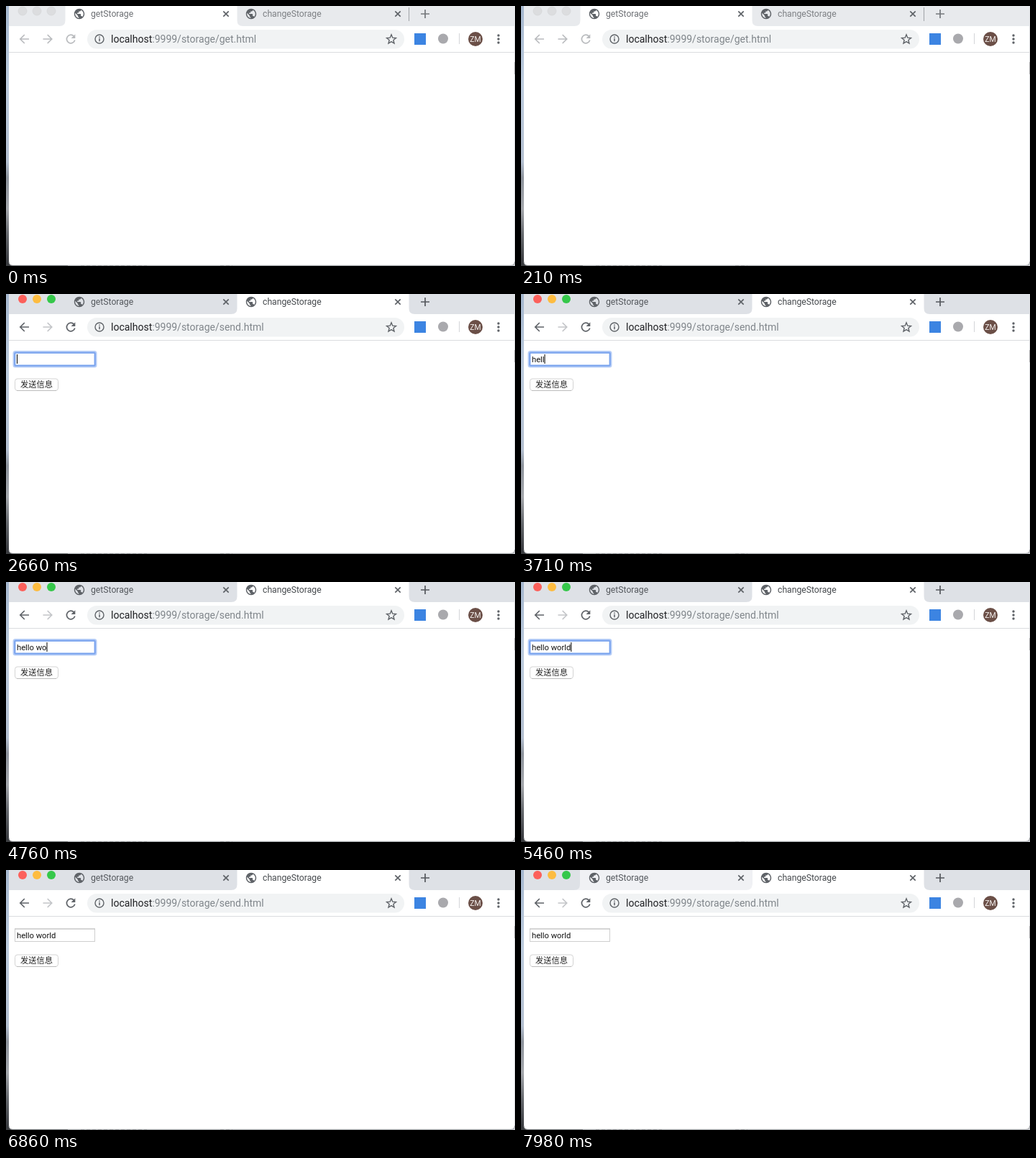
Animation of 708 by 362 pixels, one loop 8000 ms. Source, as an HTML page:

```html
<!DOCTYPE html>
<html lang="en">
<head>
<meta charset="utf-8">
<title>Storage tabs</title>
<style>
  html, body { margin: 0; width: 100%; height: 100%; overflow: hidden; background: #fff; }
  svg { display: block; }
  text { font-family: Roboto, sans-serif; white-space: pre; }
  .title { font-size: 12.2px; }
  .url { font-size: 14px; }
  .line { fill: none; stroke-width: 1.7; }
  .cjk { font-family: "Noto Sans CJK SC", "Noto Sans CJK", sans-serif; font-size: 11.25px; }

  #win {
    --bar: #dee1e6; --icon: #5f6368; --back: #5f6368; --next: #c3c5c8;
    --red: #fc605b; --amber: #fdbc40; --green: #35c84a;
    --rim: none; --name1: #54585d; --name2: #45494d; --plus: #54585d;
  }
  #win.idle {
    --bar: #e8eaed; --back: #b9bbbe; --next: #b9bbbe;
    --red: #dcdddf; --amber: #dcdddf; --green: #dcdddf;
    --rim: #d2d3d5; --name1: #6c6f73; --name2: #7c7f83; --plus: #75787c;
  }
  .idle .send, #win:not(.idle) .get { display: none; }
</style>
</head>
<body>
<svg width="708" height="362" viewBox="0 0 708 362">
  <defs>
    <linearGradient id="sky" x2="0" y2="1">
      <stop offset="0" stop-color="#a5b7ce"/>
      <stop offset=".3" stop-color="#bccbdd"/>
      <stop offset=".6" stop-color="#b3bfd0"/>
      <stop offset=".66" stop-color="#8d939c"/>
      <stop offset=".78" stop-color="#a4a7ac"/>
      <stop offset=".88" stop-color="#66696e"/>
      <stop offset="1" stop-color="#34363a"/>
    </linearGradient>
    <path id="tab" d="M-8 28Q0 28 0 20V-4H239V20Q239 28 247 28Z"/>
    <path id="globe" transform="scale(.72) translate(-12 -12)" d="M12 2C6.48 2 2 6.48 2 12s4.48 10 10 10 10-4.48 10-10S17.52 2 12 2zm-1 17.93c-3.95-.49-7-3.85-7-7.93 0-.62.08-1.21.21-1.79L9 15v1c0 1.1.9 2 2 2v1.93zm6.9-2.54c-.26-.81-1-1.39-1.9-1.39h-1v-3c0-.55-.45-1-1-1H8v-2h2c.55 0 1-.45 1-1V7h2c1.1 0 2-.9 2-2v-.41c2.93 1.19 5 4.06 5 7.41 0 2.08-.8 3.97-2.1 5.39z"/>
    <path id="cross" class="line" d="M-3.7-3.7 3.7 3.7M3.7-3.7-3.7 3.7"/>
    <path id="arrow" class="line" d="M6.5 0H-5.5M.3-6-5.7 0 .3 6"/>
    <clipPath id="frame"><path d="M4-9H707.4V356Q707.4 361 702 361H9Q4 361 4 356Z"/></clipPath>
  </defs>

  <!-- desktop behind the window -->
  <rect width="708" height="362" fill="#c9cbcf"/>
  <rect width="6" height="362" fill="url(#sky)"/>
  <path d="M0 359H86V362H0Z" fill="#3b3d40"/>
  <path d="M104 361.5H196M298 361.5H315" stroke="#8b8d90" stroke-dasharray="5 3"/>
  <path d="M707.5 78V95" stroke="#77797d"/>

  <g id="win" clip-path="url(#frame)">
    <rect x="4" width="704" height="362" fill="#fff"/>
    <rect x="4" width="704" height="28" fill="var(--bar)"/>
    <use id="hover" class="send" href="#tab" x="82" fill="#f0f1f4" opacity="0"/>
    <use class="get" href="#tab" x="82.5" fill="#fff"/>
    <use class="send" href="#tab" x="321.5" fill="#fff"/>
    <path class="get" d="M560.5 2V21" stroke="#a0a3a7"/>

    <g stroke="var(--rim)" stroke-width=".6">
      <circle cx="23" cy="7" r="6" fill="var(--red)"/>
      <circle cx="43" cy="7" r="6" fill="var(--amber)"/>
      <circle cx="63" cy="7" r="6" fill="var(--green)"/>
    </g>

    <g fill="var(--icon)">
      <use href="#globe" x="102" y="11"/>
      <use href="#globe" x="341" y="11"/>
    </g>
    <text class="title" x="118" y="15.2" fill="var(--name1)">getStorage</text>
    <text class="title" x="357" y="15.2" fill="var(--name2)">changeStorage</text>
    <g stroke="var(--icon)">
      <use href="#cross" x="306" y="11"/>
      <use href="#cross" x="545" y="11"/>
    </g>
    <path class="line" d="M577 11H589M583 5V17" stroke="var(--plus)"/>

    <use href="#arrow" x="25.5" y="46" stroke="var(--back)"/>
    <use href="#arrow" transform="translate(58 46) scale(-1 1)" stroke="var(--next)"/>
    <g stroke="var(--back)">
      <path class="line" d="M94.6 42.2A5.8 5.8 0 1 0 95.8 47.5"/>
      <path d="M96.3 39.3V45H90.6Z" fill="var(--back)" stroke="none"/>
    </g>

    <rect x="113" y="33" width="441" height="26.500" rx="13.200" fill="#f1f3f4"/>
    <circle class="line" cx="130" cy="46" r="6" stroke="#5f6368" style="stroke-width:1.4"/>
    <path d="M130 45V49.300M130 42.500V44" stroke="#5f6368" stroke-width="1.500"/>
    <text class="url" x="146" y="51" fill="#80868b"><tspan fill="#202124">localhost</tspan>:9999/storage/<tspan id="page"></tspan>.html</text>
    <path id="star" class="line" stroke="#5f6368" style="stroke-width:1.4"/>

    <rect x="568" y="38" width="16" height="16" fill="#3c84e2"/>
    <circle cx="608" cy="45.500" r="7" fill="#a9a9ad"/>
    <path d="M630.500 38V53" stroke="#d3d5d8"/>
    <circle cx="653" cy="46" r="10" fill="#6b4f47"/>
    <text x="653" y="49.800" font-size="10.500" text-anchor="middle" fill="#f5f1ef">ZM</text>
    <g fill="#5f6368">
      <circle cx="685" cy="41" r="1.700"/>
      <circle cx="685" cy="46" r="1.700"/>
      <circle cx="685" cy="51" r="1.700"/>
    </g>
    <path d="M4 64.500H708" stroke="#dbdcde"/>

    <g class="send">
      <rect x="12.500" y="82" width="111" height="17.500" fill="#fff" stroke="#cfcfcf"/>
      <path d="M12 82H124" stroke="#b9b9b9" stroke-width=".8"/>
      <g id="ring" fill="none">
        <rect x="11.500" y="81" width="113" height="19.500" rx="1.500" stroke="#b7cef7" stroke-width="4"/>
        <rect x="12.200" y="81.800" width="111.600" height="18" rx="1" stroke="#7ba4ee" stroke-width="2"/>
      </g>
      <text id="typed" x="15" y="95" font-size="11.2" fill="#111"></text>
      <rect id="caret" y="84" width="1" height="13" fill="#000"/>
      <rect x="12.500" y="118" width="60" height="16.500" rx="3.500" fill="#fff" stroke="#d4d4d4"/>
      <path d="M15 134.500H70" stroke="#bcbcbc"/>
      <text class="cjk" x="20" y="130.200" fill="#222">发送信息</text>
    </g>
  </g>
  <path d="M4 356Q4 361.300 9 361.300H702Q707.500 361.300 707.500 356" fill="none" stroke="#8f9195" stroke-width=".8"/>
</svg>
<script>
const LOOP = 8000, SWITCH = 1680, FOCUS = 2660, BLUR = 6720, HOVER = 7140;
const BLINK = 560;
const PHRASE = 'hello world';
const KEYS = [3080, 3290, 3500, 3640, 3920, 4200, 4620, 4760, 5180, 5320, 5460];

const $ = id => document.getElementById(id);
const [win, page, typed, caret, ring, hover] =
  ['win', 'page', 'typed', 'caret', 'ring', 'hover'].map($);

const corners = Array.from({ length: 10 }, (_, i) => {
  const r = i % 2 ? 3 : 6.8, a = Math.PI * (i / 5 - .5);
  return [536 + r * Math.cos(a), 46.6 + r * Math.sin(a)].map(v => v.toFixed(2)).join(' ');
});
$('star').setAttribute('d', 'M' + corners.join('L') + 'Z');

function draw(t) {
  const idle = t < SWITCH;
  win.setAttribute('class', idle ? 'idle' : '');
  page.textContent = idle ? 'get' : 'send';

  const count = KEYS.filter(k => k <= t).length;
  typed.textContent = PHRASE.slice(0, count);

  const focused = t >= FOCUS && t < BLUR;
  const since = t - (count ? KEYS[count - 1] : FOCUS);
  const lit = Math.floor(since / BLINK) % 2 === 0;
  ring.style.display = focused ? '' : 'none';
  caret.style.display = focused && lit ? '' : 'none';
  if (focused) caret.setAttribute('x', 15 + (count && typed.getComputedTextLength()));

  const p = Math.min(1, Math.max(0, (t - HOVER) / 350));
  hover.setAttribute('opacity', 1 - (1 - p) ** 2);
}

const start = performance.now();
function tick() {
  draw((performance.now() - start) % LOOP);
  requestAnimationFrame(tick);
}
tick();
</script>
</body>
</html>
```
